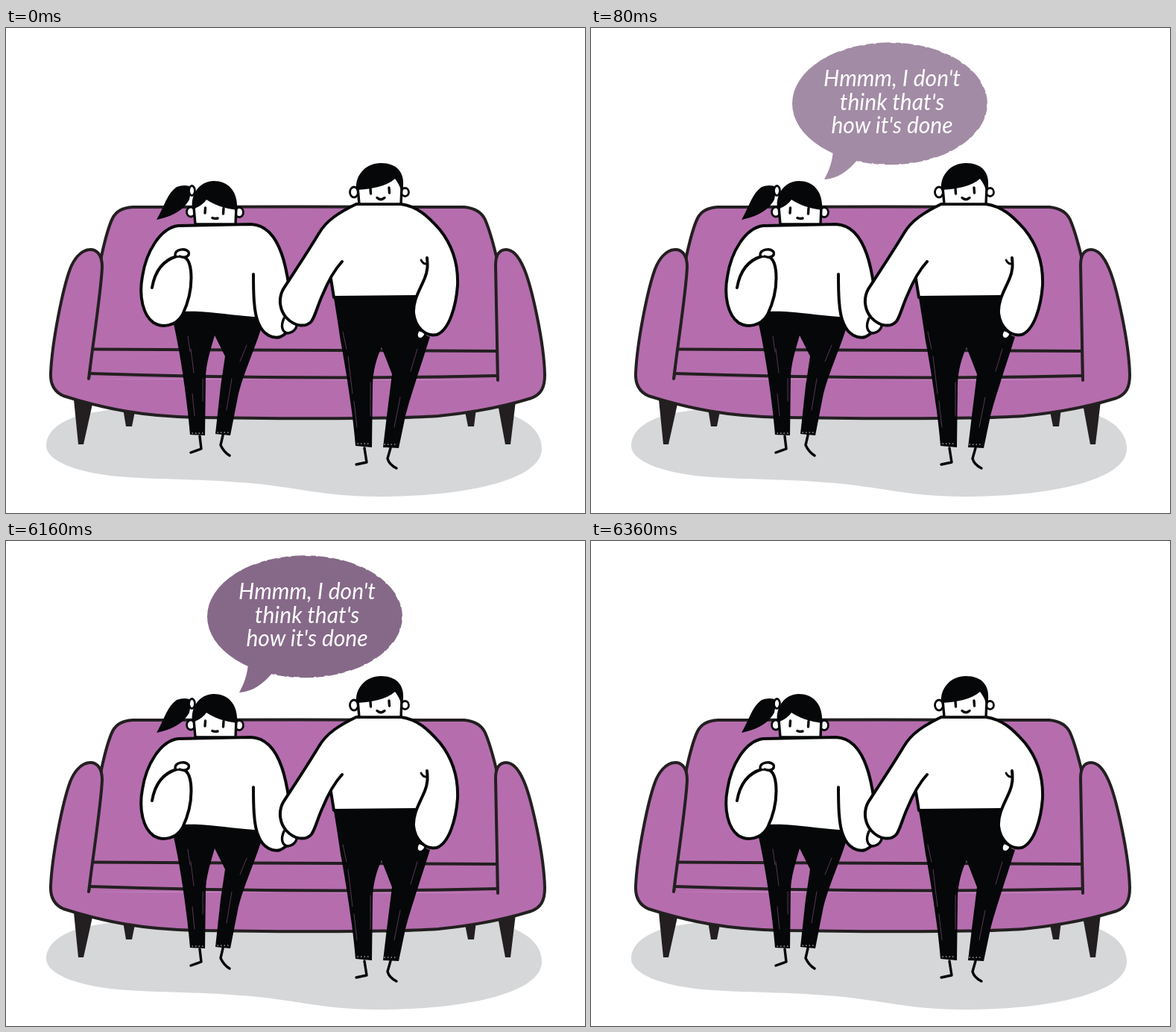
Write an HTML page that moves like this. It is 777 by 650 pixels and loops after 8 s.

```html
<!DOCTYPE html>
<html lang="en">
<head>
<meta charset="utf-8">
<title>Couple on a sofa</title>
<style>
html, body { margin: 0; width: 100%; height: 100%; overflow: hidden; background: #fff; }
svg { display: block; width: 777px; height: 650px; }
path, ellipse { stroke-linecap: round; stroke-linejoin: round; }
.sofa { fill: #b56dae; stroke: #231f20; stroke-width: 4; }
.seam { fill: none; }
.wood { fill: #231f20; }
.ink { fill: #050708; }
.skin { fill: #fff; stroke: #050708; stroke-width: 4; }
.fill { fill: #fff; }
.line { fill: none; stroke: #050708; stroke-width: 4; }
.thin { stroke-width: 3.4; }
.fine { stroke-width: 2.8; }
.scratch { fill: none; stroke: #b56dae; stroke-width: .8; opacity: .6; }
.cuff { fill: none; stroke: #fff; stroke-width: 1.2; stroke-dasharray: .5 4; }
.bubble { opacity: 0; animation: speak 8s step-end infinite; }
.bubble .shape { fill: #451849; }
.bubble .rough { fill: none; stroke: #fff; stroke-width: 1.6; stroke-linecap: butt; stroke-dasharray: 5 11 3 19 8 7 2 14; }
.bubble text { font: italic 400 30px Lato, "Open Sans", sans-serif; fill: #fff; text-anchor: middle; }
@keyframes speak {
  0% { opacity: 0; }
  .5% { opacity: .25; }
  1% { opacity: .5; }
  1.5% { opacity: .75; }
  2% { opacity: 1; }
  77% { opacity: .65; }
  78.25% { opacity: .325; }
  79.5%, 100% { opacity: 0; }
}
</style>
</head>
<body>
<svg viewBox="0 0 777 650">
  <path fill="#d5d7d9" d="M54 560C54 535 85 519 125 514L160 508H660L682 520C706 530 719 545 719 564C719 605 620 628 500 628C420 628 380 612 300 608C240 604 200 605 150 601C95 596 54 580 54 560Z"/>

  <g class="bubble">
    <path class="shape" d="M325 163C324 180 319 192 313 203C331 202 345 192 359 175Z"/>
    <ellipse class="shape" cx="401" cy="101.3" rx="131" ry="82"/>
    <path class="rough" d="M300 48C325 30 360 20 401 19.3A131 82 0 0 1 532 101.3A131 82 0 0 1 401 183.3Q378 183 360 179"/>
    <text x="404" y="78">Hmmm, I don't</text>
    <text x="404" y="110">think that's</text>
    <text x="404" y="141">how it's done</text>
  </g>

  <g id="sofa">
    <path class="wood" d="M91 498L116 504L104 558H97ZM660 504L684 500L677 558H670ZM157 510L173 514L169 534H161ZM616 514L631 510L628 534H620Z"/>
    <path class="sofa" d="M111 470L128 306C133 283 138 265 143 255Q150 241 170 240Q390 239 615 240Q636 242 643 257Q650 273 658 306L660 472"/>
    <path class="sofa" d="M111 470C117 420 128 350 129 320C129 302 120 296 112 297C100 298 91 310 86 323C76 350 62 420 60 462C59 480 68 489 77 493C130 510 185 521 260 522C400 524 520 524 580 520C630 515 670 507 705 496C718 491 723 482 723 465C722 420 705 345 695 322C689 308 681 297 671 297C661 297 657 306 657 318L660 472"/>
    <path class="sofa seam" d="M117 430.500L658 433M112 463Q390 472 659 466"/>
  </g>

  <g id="woman">
    <path class="ink" d="M224 392L238 376L343 388L342 404C332 435 316 470 311 495L301 546L281 544L288 480L294 440L280 412C275 430 268 450 268 470L267 546L247 545C243 500 235 440 224 392Z"/>
    <path class="scratch" d="M244 413L247 434M248 430L252 462M250 490L253 520M264 470V500M303 470L296 512M323 425L314 447"/>
    <path class="cuff" d="M250 543H265M284 542H300"/>
    <path class="line thin" d="M260 547L262 564L248 569M291 546L288 559Q292 568 300 573"/>
    <path class="fill" d="M231 265L329 263C350 264 362 280 370 303C377 323 379 340 380 348V403C377 412 370 415 362 415C350 413 342 406 334 387C300 385 265 378 238 380C226 403 204 402 192 390C179 374 179 340 185 322C193 292 210 267 231 265Z"/>
    <path class="line" d="M380 348C378 335 376 320 370 303C362 280 350 264 329 263L231 265C207 268 188 300 183 333C178 360 184 385 198 395C210 402 228 400 237 384C246 365 250 345 248 325C246 309 240 304 229 306C212 311 200 325 196 348M332 330C332 350 332 382 339 396C345 411 358 417 368 414Q377 410 379 403"/>
    <path class="skin thin" d="M227 304C227 297 240 294 245 300C247 306 240 309 233 306"/>
    <ellipse class="skin fine" cx="248" cy="246.500" rx="5.500" ry="6.500"/>
    <ellipse class="skin fine" cx="313" cy="247" rx="5.500" ry="6.500"/>
    <path class="fill" d="M252 232H309L308 263H254Z"/>
    <path class="line thin" d="M252 240L254 263H308L309 240"/>
    <path class="ink" d="M202 257C212 240 216 222 229 213Q240 209 249 213L246 230C238 244 225 252 202 257Z"/>
    <ellipse class="skin fine" cx="249.500" cy="218" rx="4" ry="6.500"/>
    <path class="ink" d="M250 243C247 220 262 205 279 205C298 205 312 219 310 244C294 242 279 237 269 230C265 236 259 240 250 243Z"/>
    <path class="line thin" d="M267.500 241L267 248M292 241.500L291.500 249M277 254.500Q280 256 284 255"/>
  </g>

  <g id="man">
    <path class="ink" d="M439 356H549L547 385C550 400 558 411 569 414C556 455 541 500 536 520L527 563L506 562L511 520L518 464L504 428C498 440 492 460 492 480L491 562L469 560C466 520 455 450 449 420Q444 385 439 356Z"/>
    <path class="scratch" d="M452 407L457 430M459 440L465 490M467 500L471 535M489 475V520M529 495L521 535M552 430L543 460"/>
    <path class="cuff" d="M472 557H489M508 558H525"/>
    <path class="line thin" d="M481 563L484 582L470 585M516 563L512 577Q514 585 524 590"/>
    <path class="skin thin" d="M373 389C368 400 371 408 378 409C386 408 391 402 390 396"/>
    <path class="skin fine" d="M553 406C549 413 553 418 558 416Q562 414 563 409"/>
    <path class="fill" d="M470 236H530C552 239 566 252 582 270C602 295 607 320 606 345C604 372 595 405 578 411C562 414 549 400 547 382Q546 370 549 359L440 360L437 335C425 355 418 372 410 393C402 402 387 400 376 388C369 380 364 365 372 350C385 330 405 300 420 275C430 258 447 247 470 236Z"/>
    <path class="line" d="M451 313C440 325 432 340 425 357C418 372 415 386 410 393C402 402 387 400 376 388C369 380 364 365 372 350C385 330 405 300 420 275C430 258 447 247 470 236H530C552 239 566 252 582 270C602 295 607 320 606 345C604 372 595 405 578 411C562 414 549 400 547 382C546 365 555 352 562 335C566 325 566 318 565 308M436 336L440 361L549 360"/>
    <path class="line fine" d="M557 311Q560 317 565 316"/>
    <ellipse class="skin fine" cx="467" cy="220" rx="5.500" ry="7"/>
    <ellipse class="skin fine" cx="535.500" cy="220" rx="5" ry="5.500"/>
    <path class="fill" d="M472 205H531L530 236H474Z"/>
    <path class="line thin" d="M472 214L474 236H530L531 214"/>
    <path class="ink" d="M470 217C468 196 484 181 503 181C524 181 535 193 533 213L531 220C529 213 526 207 522 202C511 212 490 216 470 217Z"/>
    <path class="line thin" d="M489 215L489.500 222M514 214L514.500 221M498 227.500Q503 232 508 227.500"/>
  </g>
</svg>
</body>
</html>
```
